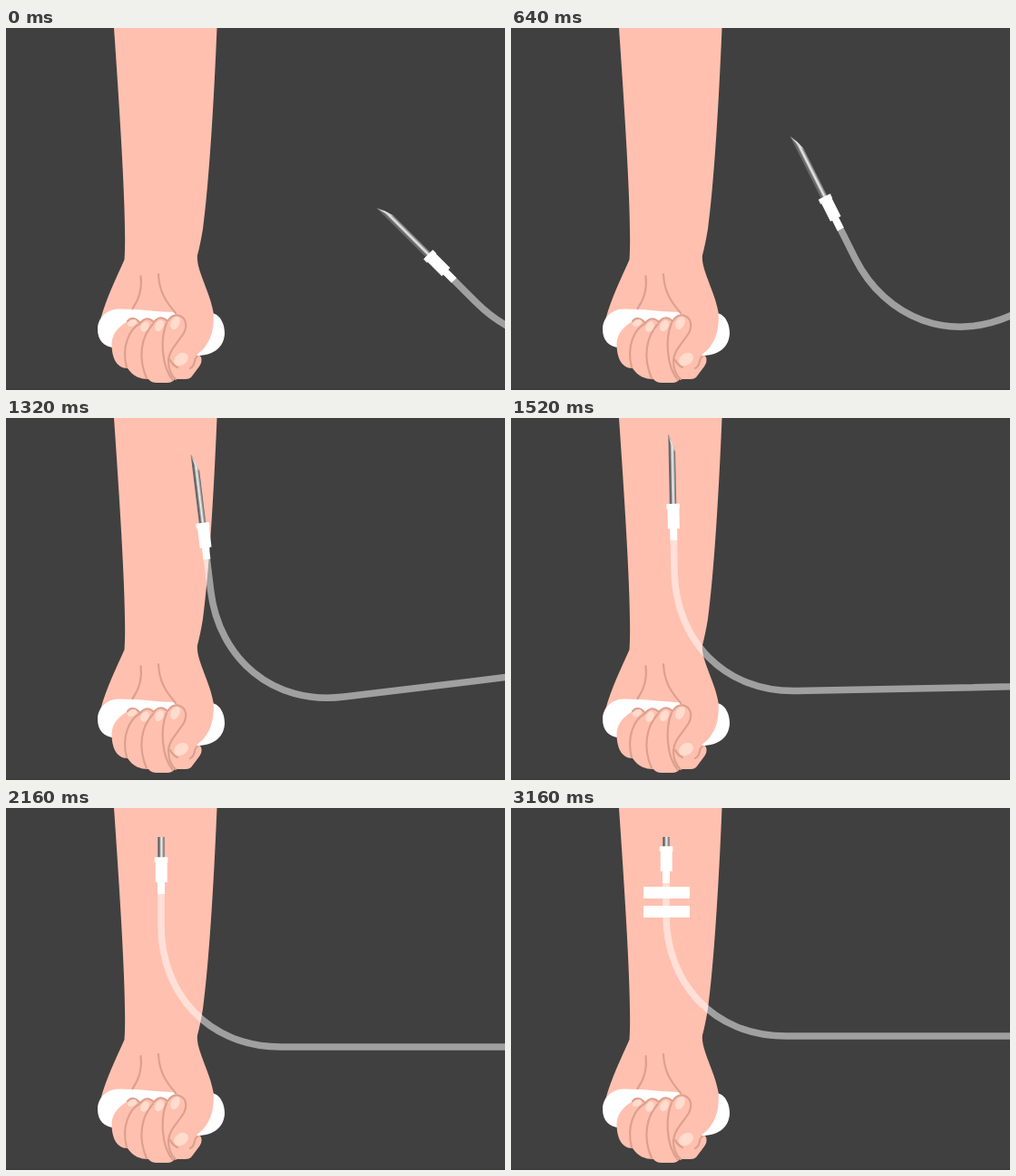
Write an HTML page that moves like this. It is 550x400 px and loops after 3.96 s.

```html
<!DOCTYPE html>
<html lang="en">
<head>
<meta charset="utf-8">
<title>Inserting a drip</title>
<style>
  html, body { margin: 0; width: 100%; height: 100%; overflow: hidden; background: #404040; }
  svg { display: block; width: 550px; height: 400px; }
  .skin { fill: #ffc0af; }
  .line { fill: none; stroke: #dda08f; stroke-width: 2.2; stroke-linecap: round; stroke-linejoin: round; }
  .nail { fill: #ffdccd; }
  .white { fill: #fff; }
</style>
</head>
<body>
<svg viewBox="0 0 550 400">
  <defs>
    <linearGradient id="steel">
      <stop offset="0" stop-color="#777"/>
      <stop offset=".2" stop-color="#5c5c5c"/>
      <stop offset=".55" stop-color="#f4f4f4"/>
      <stop offset=".8" stop-color="#a0a0a0"/>
      <stop offset="1" stop-color="#5c5c5c"/>
    </linearGradient>
    <clipPath id="skinClip"><rect id="visible" width="550" height="400"/></clipPath>
  </defs>
  <rect width="550" height="400" fill="#404040"/>
  <rect y="398.5" width="550" height="1.5" fill="#3a3a3a"/>

  <!-- ball behind the palm, then forearm and palm -->
  <path class="white" d="M222 315C235 313 241 326 241 338C240 352 230 362 210 362L195 345Z"/>
  <path class="skin" d="M119 0H232.500C229 85 223.500 175 217 222Q214 240 211 251C209 266 225 292 228.500 314C230 332 226 351 209 362L150 372L110 340L104.500 321C110 300 122 275 130.500 256C133.500 215 125.500 95 119 0Z"/>
  <path class="white" d="M187 314C168 314 150 310.500 124 310.500C110 311 101 321 101 333C101 345 108 353 120 353L150 345L186 322Z"/>

  <!-- fist -->
  <path class="skin" d="M116.500 351C116 340 122 331 134 324Q140 317 148 326Q155 317 163 325Q170 316 178 324Q183 316 190 317.500C199 320 200 327 198 333L200 362L210 362Q215 361 215.500 366Q216 370 213 374L204 386Q202 388 198 388H186Q183 392 178 392H166Q160 392 157 388C148 388 140 385 134 376C121 376 117 363 116.500 351Z"/>
  <path class="line" d="M148.500 274C150 286 148 298 139.500 310M168 272C169 292 176 302 187 315"/>
  <path class="line" d="M134 324Q140 317 148 326Q155 317 163 325Q170 316 178 324Q183 316 190 317.500C199 320 200 329 196 337C187 351 180 356 179 367C179 377 182 384 187 388"/>
  <path class="line" d="M147 327C136 333 127 352 133 375M162 327C149 341 145 364 155 387M177 326C170 342 171 374 184 389"/>
  <path class="line" d="M181 367Q184 373 189 375M203 376C210 373 206 365 211 363"/>
  <g class="nail">
    <ellipse cx="139" cy="326" rx="5.500" ry="3.500" transform="rotate(-25 139 326)"/>
    <ellipse cx="153" cy="330" rx="4.300" ry="6" transform="rotate(30 153 330)"/>
    <ellipse cx="169" cy="329" rx="4.500" ry="6.500" transform="rotate(28 169 329)"/>
    <ellipse cx="186.500" cy="326" rx="4.800" ry="7.500" transform="rotate(25 186.500 326)"/>
    <ellipse cx="193" cy="366" rx="8.500" ry="6.500" transform="rotate(-35 193 366)"/>
  </g>

  <!-- drip, with its origin at the top of the hub -->
  <g clip-path="url(#skinClip)">
    <g id="drip">
      <path d="M0 40V75C0 150 52 209 132 209H800" fill="none" stroke="#fff" stroke-opacity=".5" stroke-width="7.500"/>
      <path d="M-3.800 1V-77.500Q1 -68 3.600 -58V1Z" fill="url(#steel)"/>
      <path d="M-3.600 -76.500Q1 -67 3.200 -58Q-1 -63 -3.600 -76.500Z" fill="#dcdcdc"/>
      <path class="white" d="M-7.400 -.5H7.400V5H-7.400Z" opacity=".85"/>
      <path class="white" d="M-6.200 -.5H6.700V27H4V40H-4V27H-6.200Z"/>
    </g>
  </g>

  <g id="tape" class="white">
    <rect width="51" height="13" rx="1"/>
    <rect y="21" width="51" height="13" rx="1"/>
  </g>
</svg>
<script>
  const LOOP = 3960, STEP = 40;
  const LAND = 1560, INSERTED = 2360, TAPED = 3160, TAPE_FADE = 280;
  const get = id => document.getElementById(id);
  const drip = get('drip'), tape = get('tape'), visible = get('visible');
  const part = (t, from, to) => Math.min(1, Math.max(0, (t - from) / (to - from)));
  const mix = (a, b, k) => a + (b - a) * k;

  function draw(t) {
    // approach while turning upright, then slide under the skin
    const near = part(t, 0, LAND), push = part(t, LAND, INSERTED);
    const x = mix(448, 171, near), y = mix(233, 66, near) - 48 * push;
    drip.setAttribute('transform',
      `translate(${x} ${y}) rotate(${mix(-45, 0, near)}) translate(0 25)`);
    visible.setAttribute('y', t < LAND ? 0 : 32);

    const slide = part(t, INSERTED, TAPED);
    tape.setAttribute('transform',
      `translate(${mix(273.5, 146, slide)} ${mix(92.7, 87, slide)})`);
    tape.setAttribute('opacity', part(t, INSERTED, INSERTED + TAPE_FADE));
  }

  const start = performance.now();
  function tick() {
    const t = (performance.now() - start) % LOOP;
    draw(Math.floor(t / STEP) * STEP);
    requestAnimationFrame(tick);
  }
  tick();
</script>
</body>
</html>
```
